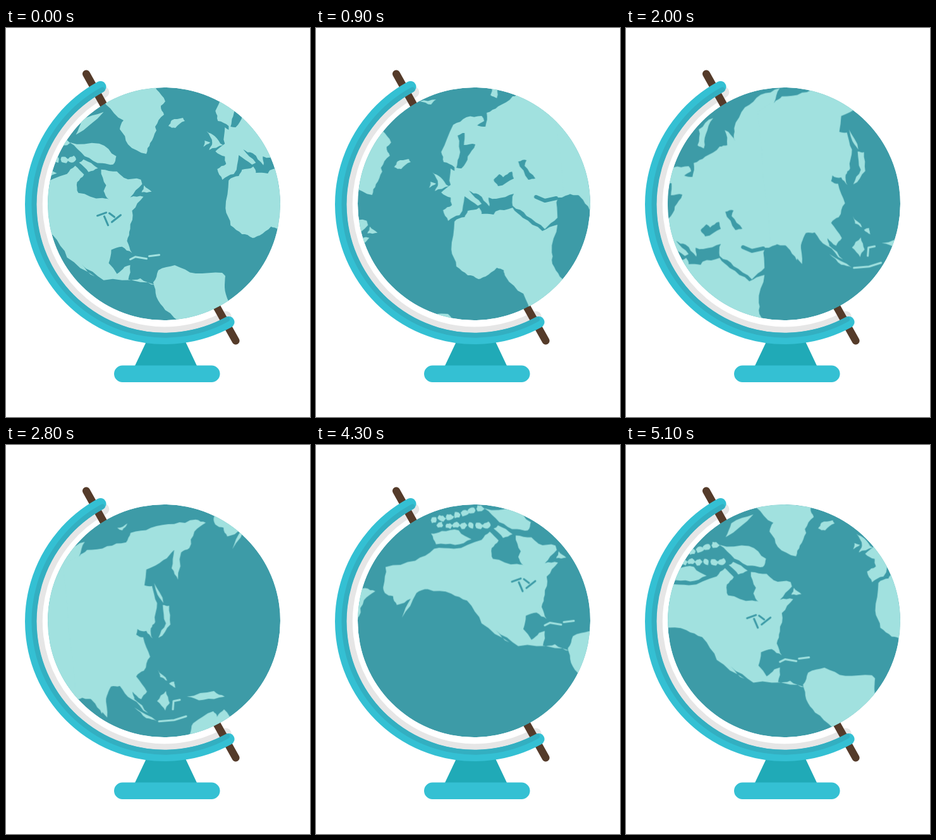
Animation of 481x615 px, one loop 5.2 s. Source, as an HTML page:

```html
<!DOCTYPE html>
<html lang="en">
<head>
<meta charset="utf-8">
<title>Spinning desk globe</title>
<style>
  html, body { margin: 0; width: 100%; height: 100%; overflow: hidden; background: #fff; }
  svg { display: block; }
  .land { fill: #a1e1df; stroke: none; }
  .sea { fill: #3d9ba7; }
  polyline { fill: none; stroke: #a1e1df; stroke-width: 3; stroke-linecap: round; stroke-linejoin: round; }
  polyline.sea { fill: none; stroke: #3d9ba7; }
  .wide { stroke-width: 6; }
  .arc { fill: none; stroke-linecap: round; }
  #spin { animation: spin 5200ms steps(52) infinite; }
  @keyframes spin { to { transform: translate(-770.12px, 375.44px); } }
</style>
</head>
<body>
<svg width="481" height="615" viewBox="0 0 481 615">
  <defs>
    <clipPath id="ball"><circle cx="250" cy="278" r="184"/></clipPath>

    <g id="world" class="land">
      <g id="america" transform="translate(-165.5 80.8)">
        <polygon points="107 222 110 193 157 183 187 164 218 164 262 150 275 137 289 151 278 163 280 180 318 188 328 190 320 177 324 168 316 143 341 146 352 156 379 159 381 166 362 187 383 186 365 208 362 237 357 256 365 275 349 265 332 270 328 291 341 308 353 297 362 294 359 317 378 315 402 325 378 321 320 318 284 292 306 312 262 282 239 246 214 235 177 228 159 234 136 273 150 243 128 253 122 239 109 234"/>
        <polygon points="384 168 396 178 380 179"/>
        <polygon points="266 100 313 102 340 122 335 135 318 133 290 122"/>
        <polygon points="288 127 311 141 296 147 281 132"/>
        <polygon points="285 66 320 52 276 88"/>
        <polygon points="182 140 199 136 226 135 246 149 220 158 190 157"/>
        <polyline points="362 285 370 281 388 284"/>
        <polyline points="392 280 408 278"/>
        <polyline class="sea" points="310 216 324 211"/>
        <polyline class="sea" points="321 217 327 231"/>
        <polyline class="sea" points="329 212 337 218"/>
        <polyline class="sea" points="333 226 347 215"/>
      </g>

      <g id="atlantic">
        <polygon points="238 97 232 82 150 108 158 121 186 146 180 160 193 184 222 199 228 182 238 162 236 156 250 137 245 123 252 116"/>
        <polygon points="257 155 262 146 280 142 283 147 268 158"/>
        <polygon points="233 402 241 383 267 375 300 388 342 387 347 392 346 410 352 432 345 450 280 470 252 446 238 425"/>
      </g>

      <g id="europe" transform="translate(133.3 -65)">
        <polygon points="311 281 313 262 285 270 273 268 274 282 257 263 242 257 262 278 256 281 235 266 227 296 209 305 201 288 215 280 213 268 198 260 213 248 213 222 219 226 219 220 202 212 198 196 217 153 238 141 262 139 266 147 255 154 268 156 270 134 288 124 311 108 323 106 319 82 336 100 334 79 351 46 376 26 406 16 397 39 480 130 433 288 418 267 405 260 383 268 382 300 362 318 333 297"/>
        <polygon points="219 306 235 299 240 289 258 284 262 294 281 295 284 290 311 284 327 300 358 321 382 311 373 355 377 378 390 397 395 420 340 455 328 420 300 393 297 383 286 379 268 393 257 397 240 391 222 377 214 350"/>
        <polygon points="184 228 197 236 210 250 188 258 193 247"/>
        <polygon points="181 243 190 246 179 253"/>
        <polygon points="164 116 190 113 182 121"/>
        <polygon points="276 106 278 81 301 63 289 89 286 111"/>
        <polygon class="sea" points="224 170 235 166 234 185 252 184 240 203 230 222 222 221 226 205"/>
        <polygon class="sea" points="281 240 290 231 296 236 310 227 313 238 288 250"/>
        <polygon class="sea" points="320 211 333 209 330 218 347 238 336 240"/>
        <polyline class="sea wide" points="348 267 362 273 380 269"/>
      </g>

      <g id="pacific" transform="translate(414.7 -202.2)">
        <polygon points="90 190 116 176 128 166 160 160 190 154 197 139 229 131 266 125 300 118 316 123 298 137 290 163 277 170 272 213 262 195 266 166 249 182 222 197 219 222 231 223 239 250 236 280 229 290 232 306 222 294 208 291 206 300 217 304 228 335 218 357 206 366 223 390 214 402 200 390 203 402 225 424 199 402 180 381 166 382 158 398 160 431 141 405 110 398"/>
        <polygon points="234 218 249 250 238 232"/>
        <polygon points="248 253 258 254 260 284 241 305 253 282"/>
        <polygon points="240 355 255 373 244 367"/>
        <polygon points="258 377 266 374 268 384"/>
        <polygon points="239 405 253 389 259 408 252 420"/>
        <polygon points="203 415 239 437 222 432"/>
        <polygon points="286 398 329 389 346 398 312 403"/>
        <polygon points="291 457 296 440 328 421 334 430 345 418 362 440 300 475"/>
        <polygon points="176 131 192 124 184 135"/>
        <polyline points="242 437 266 435 285 429"/>
        <polyline points="275 403 265 405 264 418"/>
      </g>
    </g>
  </defs>

  <path fill="#20aab7" d="M222 496H284L302.5 535H203.5Z"/>
  <rect x="171" y="533.5" width="167.5" height="26.5" rx="13.25" fill="#34c0d3"/>

  <path class="arc" stroke="#e6e6e6" stroke-width="17.5" d="M154.5 101.5A202 202 0 1 0 348 456.500"/>
  <path class="arc" stroke="#553b2a" stroke-width="12" d="M127 72.5L363.5 494.5"/>
  <path class="arc" stroke="#34c0d3" stroke-width="18" d="M149.5 93A211.3 211.3 0 1 0 352.5 465"/>
  <path class="arc" stroke="#33afc1" stroke-width="8" d="M152.5 97.5A206.3 206.3 0 1 0 350 460.5"/>

  <g clip-path="url(#ball)">
    <circle class="sea" cx="250" cy="278" r="184"/>
    <g id="spin">
      <use href="#world"/>
      <use href="#world" x="802.3" y="-391.2"/>
    </g>
  </g>
</svg>
<script>
  let seed = 7;
  const rand = () => (seed = seed * 16807 % 2147483647) / 2147483647;
  const jitter = size => (rand() - 0.5) * size;

  // Split each edge and nudge its middle, for a ragged coast
  function roughen(points) {
    return points.flatMap(([x, y], i) => {
      const [nx, ny] = points[(i + 1) % points.length];
      const len = Math.hypot(nx - x, ny - y);
      if (len < 5) return [[x, y]];
      const push = jitter(Math.min(len * 0.24, 4)) / len;
      return [[x, y], [(x + nx) / 2 - (ny - y) * push, (y + ny) / 2 + (nx - x) * push]];
    });
  }

  // Two rows of small arctic islands
  const america = document.getElementById('america');
  for (let i = 0; i < 14; i++) {
    const col = i % 7, low = i > 6;
    const cx = 187 + col * 12 + low * 10, cy = 119 - col * 3 + low * (8 + col * 3);
    const isle = document.createElementNS('http://www.w3.org/2000/svg', 'polygon');
    const corners = Array.from({ length: 6 }, (_, k) => {
      const a = k * Math.PI / 3;
      return [cx + Math.cos(a) * (6 + jitter(4)), cy + Math.sin(a) * (5 + jitter(4))];
    });
    isle.setAttribute('points', corners.join(' '));
    america.append(isle);
  }

  for (const shape of document.querySelectorAll('polygon')) {
    const nums = shape.getAttribute('points').split(/[ ,]/).map(Number);
    let points = [];
    for (let i = 0; i < nums.length; i += 2) points.push([nums[i], nums[i + 1]]);
    points = roughen(roughen(points));
    shape.setAttribute('points', points.map(p => p.map(n => n.toFixed(1))).join(' '));
  }
</script>
</body>
</html>
```
